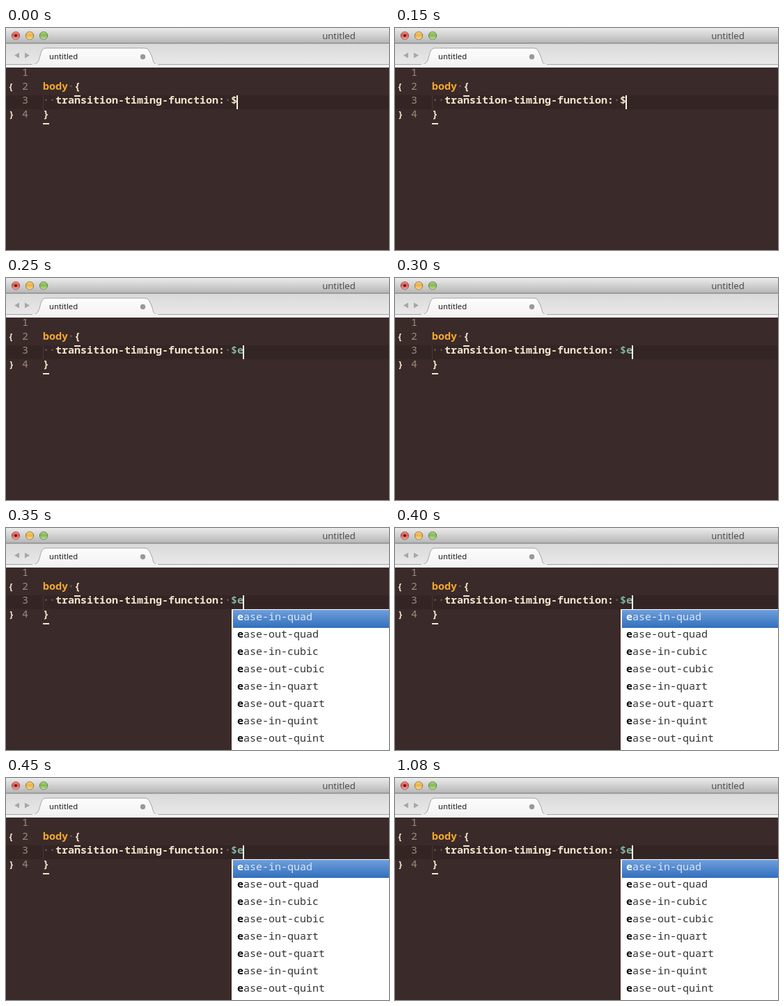
An HTML page for the animation above (1.5 s loop, 550x320 px).

```html
<!DOCTYPE html>
<html lang="en">
<head>
<meta charset="utf-8">
<title>Editor autocompletion</title>
<style>
  html, body { margin: 0; width: 100%; height: 100%; overflow: hidden; background: #3b2a2a; }
  svg { display: block; width: 550px; height: 320px; }
  text { white-space: pre; }
  .ui { font-family: "Open Sans", sans-serif; }
  .code { font: 600 15px "Noto Sans Mono", monospace; fill: #f1e6cb; }
  .gutter { font-weight: 500; fill: #9c8b7c; }
  .fold { font-size: 13px; }
  .space { fill: #6b5651; }
  .option { font: 400 15px "Noto Sans Mono", monospace; fill: #333; }
  .option .match { font-weight: 700; fill: #000; }
  .option.selected { fill: #dfe8f4; }
  .option.selected .match { fill: #fff; }
</style>
</head>
<body>
<svg viewBox="0 0 550 320">
  <defs>
    <linearGradient id="titleFill" x2="0" y2="1">
      <stop stop-color="#ebebeb"/><stop offset="1" stop-color="#b5b5b5"/>
    </linearGradient>
    <linearGradient id="barFill" x2="0" y2="1">
      <stop stop-color="#d9d9d9"/><stop offset="1" stop-color="#e9e9e9"/>
    </linearGradient>
    <linearGradient id="tabFill" x2="0" y2="1">
      <stop stop-color="#fdfdfd"/><stop offset="1" stop-color="#f3f3f3"/>
    </linearGradient>
    <linearGradient id="selectedFill" x2="0" y2="1">
      <stop stop-color="#6f9fdb"/><stop offset="1" stop-color="#326fbd"/>
    </linearGradient>
    <linearGradient id="gloss" x2="0" y2="1">
      <stop stop-color="#fff" stop-opacity=".35"/>
      <stop offset=".45" stop-color="#fff" stop-opacity="0"/>
      <stop offset="1" stop-color="#fff" stop-opacity=".5"/>
    </linearGradient>
  </defs>

  <rect width="550" height="320" fill="#3b2a2a"/>
  <rect y="97" width="550" height="20" fill="#342525"/>

  <!-- window chrome -->
  <rect width="550" height="22" fill="url(#titleFill)"/>
  <rect y="22" width="550" height="31" fill="url(#barFill)"/>
  <rect y="21.5" width="550" height="1" fill="#747474"/>
  <rect y="52" width="550" height="5" fill="#f3f3f3"/>
  <rect y="52" width="550" height="1" fill="#a6a6a6"/>
  <path d="M38 53C46 52 47 47 49 40S52 29 58 29H199C205 29 206 34 209 40S210 52 218 53"
        fill="url(#tabFill)" stroke="#a2a2a2"/>
  <rect x="38" y="52" width="180" height="2" fill="#f3f3f3"/>
  <path d="M19 35.5V43.5L12 39.5ZM27 35.5V43.5L34 39.5Z" fill="#a6a6a6"/>
  <circle cx="196.5" cy="41.5" r="3.7" fill="#999"/>
  <g id="lights"></g>
  <circle cx="14" cy="11" r="2" fill="#621512"/>
  <text class="ui" x="478" y="16" font-size="13.2" text-anchor="middle" fill="#454545">untitled</text>
  <text class="ui" x="62" y="45" font-size="11.4" fill="#111">untitled</text>

  <!-- code -->
  <g id="numbers"></g>
  <text class="code fold" x="3" y="89">{</text>
  <text class="code fold" x="4" y="129">}</text>
  <path d="M53.5 98V117" stroke="#5c4844" stroke-dasharray="1 1"/>
  <text class="code" x="53" y="89"><tspan fill="#f4a92f">body</tspan><tspan class="space">·</tspan>{</text>
  <text class="code" x="53" y="109"><tspan class="space">··</tspan>transition-timing-function:<tspan class="space">·</tspan><tspan id="typed"></tspan></text>
  <text class="code" x="53" y="129">}</text>
  <path d="M98 98H107M53 138H62" stroke="#f1e6cb" stroke-width="2"/>
  <rect id="caret" y="97" width="2" height="20" fill="#f8f4e9"/>

  <g id="popup">
    <rect x="324" y="117" width="226" height="203" fill="#fff"/>
    <rect x="326" y="118" width="224" height="26" fill="url(#selectedFill)"/>
  </g>
</svg>
<script>
const byId = id => document.getElementById(id);
const LOOP = 1500, TYPE_AT = 250, POPUP_AT = 350;
const CHAR_WIDTH = 9, VALUE_X = 323;

byId("lights").innerHTML = ["#e8554c", "#efb33c", "#82bd49"].map((color, i) => {
  const circle = `cx="${14 + 20 * i}" cy="11" r="5.7"`;
  return `<circle ${circle} fill="${color}" stroke="#000" stroke-opacity=".4"/>
    <circle ${circle} fill="url(#gloss)"/>`;
}).join("");

byId("numbers").innerHTML = [1, 2, 3, 4].map(n =>
  `<text class="code gutter" x="23" y="${49 + 20 * n}">${n}</text>`).join("");

const options = ["quad", "cubic", "quart", "quint"]
  .flatMap(curve => [`ease-in-${curve}`, `ease-out-${curve}`]);
byId("popup").innerHTML += options.map((name, i) =>
  `<text class="option ${i ? "" : "selected"}" x="332" y="${133 + 25 * i}"><tspan class="match">${name[0]}</tspan>${name.slice(1)}</text>`
).join("");

function render(time) {
  const t = time % LOOP;
  const value = t < TYPE_AT ? "$" : "$e";
  const typed = byId("typed");
  typed.textContent = value;
  typed.setAttribute("fill", value === "$" ? "#f1e6cb" : "#83b3a3");
  byId("caret").setAttribute("x", VALUE_X + CHAR_WIDTH * value.length - 1);
  byId("popup").setAttribute("visibility", t < POPUP_AT ? "hidden" : "visible");
}

const start = performance.now();
function tick() {
  render(performance.now() - start);
  requestAnimationFrame(tick);
}
tick();
</script>
</body>
</html>
```
